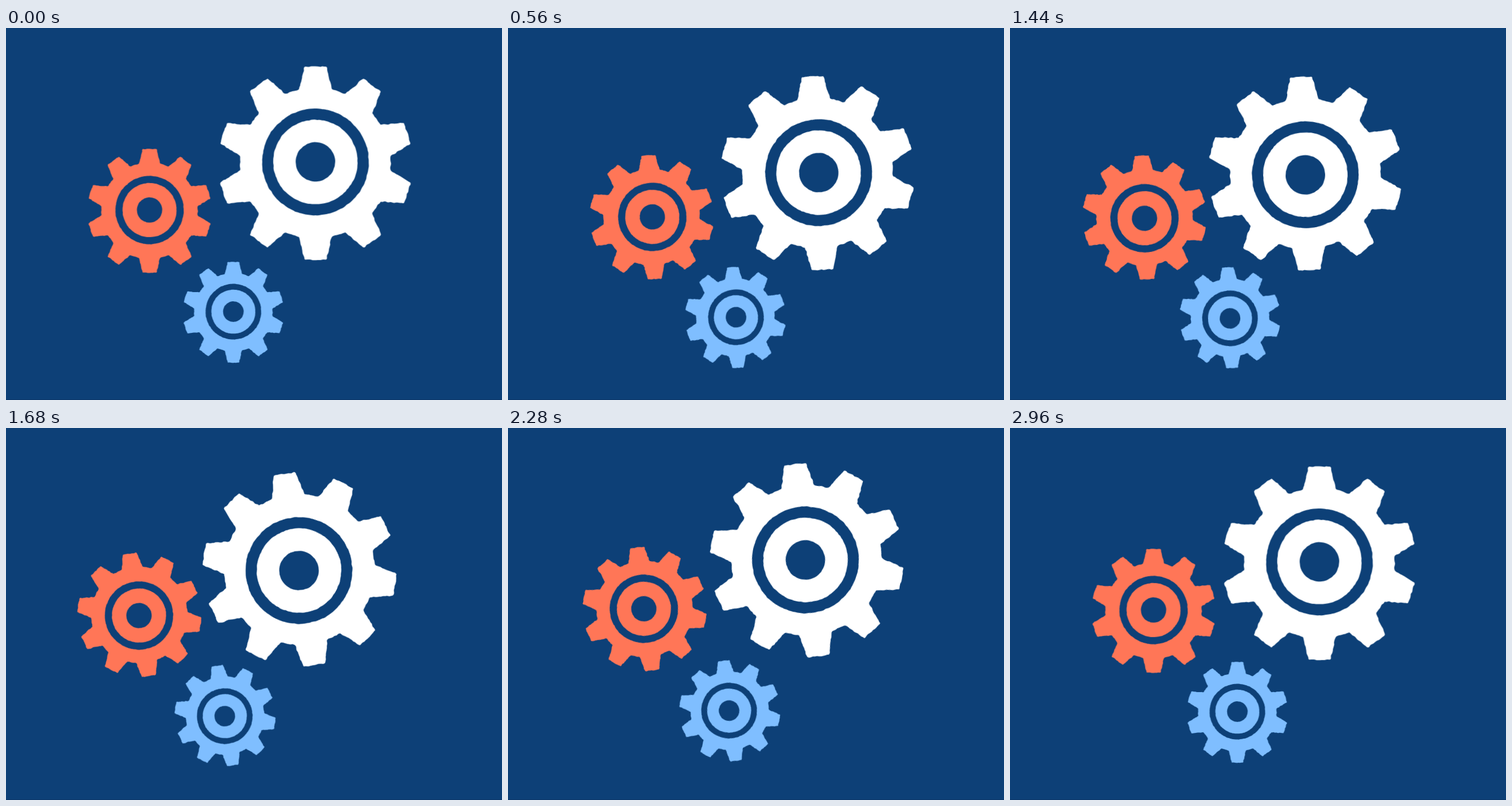
Animation of 864 by 648 pixels, one loop 3 s. Source, as an HTML page:

```html
<!DOCTYPE html>
<html lang="en">
<head>
<meta charset="utf-8">
<title>Turning gears</title>
<style>
  html, body { margin: 0; width: 100%; height: 100%; overflow: hidden; background: #0d4077; }
  svg { display: block; width: 100vw; height: 100vh; }
</style>
</head>
<body>
<svg viewBox="0 0 864 648">
  <rect width="864" height="648" fill="#0d4077"/>
  <rect y="647" width="864" height="1" fill="#0b3566"/>
</svg>
<script>
const LOOP = 3000, TURN = 2920, STEP = 40;
const TEETH = 10;
const OFFSET = [12.5, -11]; // ring centre relative to the pivot
const RIM_SHIFT = 2.2;      // the toothed rim sits a little below the rings
const GEARS = [
  { x: 526.5, y: 244.2, scale: 1, color: '#ffffff' },
  { x: 242, y: 324.1, scale: 0.64, color: '#ff7657' },
  { x: 389.5, y: 499.8, scale: 0.521, color: '#7fbeff' }
];

let seed = 7;
function random() {
  seed = (seed * 16807) % 2147483647;
  return seed / 2147483647;
}

function rotate([x, y], angle) {
  const c = Math.cos(angle), s = Math.sin(angle);
  return [x * c - y * s, x * s + y * c];
}

function toothedOutline() {
  const tooth = [[-28.5, -128.5], [-19, -168.3], [19, -168.3], [28.5, -128.5]];
  const points = [];
  for (let i = 0; i < TEETH; i++)
    points.push(...tooth.map(p => rotate(p, i * 2 * Math.PI / TEETH)));
  return points.map(([x, y]) => [x, y + RIM_SHIFT]);
}

function circle(radius) {
  const n = Math.round(radius * 0.8);
  return Array.from({ length: n }, (_, i) => rotate([0, -radius], i * 2 * Math.PI / n));
}

// Closed path with slightly ragged edges; the corners stay in place.
function ragged(corners, amount) {
  const points = [];
  corners.forEach(([x, y], i) => {
    const [nx, ny] = corners[(i + 1) % corners.length];
    const n = Math.max(1, Math.round(Math.hypot(nx - x, ny - y) / 3.5));
    for (let k = 0; k < n; k++) {
      const reach = k || n === 1 ? amount : 0;
      const jitter = () => (random() - 0.5) * 2 * reach;
      points.push([x + (nx - x) * k / n + jitter(), y + (ny - y) * k / n + jitter()]);
    }
  });
  const text = p => p.map(v => v.toFixed(2)).join(' ');
  const mid = (p, q) => [(p[0] + q[0]) / 2, (p[1] + q[1]) / 2];
  const last = points[points.length - 1];
  let d = 'M' + text(mid(last, points[0]));
  points.forEach((p, i) => {
    d += 'Q' + text(p) + ' ' + text(mid(p, points[(i + 1) % points.length]));
  });
  return d + 'Z';
}

function add(parent, name, attrs = {}) {
  const node = document.createElementNS('http://www.w3.org/2000/svg', name);
  for (const key in attrs) node.setAttribute(key, attrs[key]);
  return parent.appendChild(node);
}

const shape = ragged(toothedOutline(), 1) + ragged(circle(93), 0.8) +
  ragged(circle(73.7), 0.8) + ragged(circle(34.5), 0.4);
const stage = document.querySelector('svg');

for (const { x, y, scale, color } of GEARS) {
  const pivot = add(stage, 'g', { transform: `translate(${x} ${y}) scale(${scale})` });
  const spinner = add(pivot, 'g');
  add(spinner, 'path', {
    d: shape, fill: color, 'fill-rule': 'evenodd', transform: `translate(${OFFSET})`
  });
  spinner.animate([
    { transform: 'rotate(0deg)', offset: 0, easing: `steps(${TURN / STEP})` },
    { transform: 'rotate(360deg)', offset: TURN / LOOP },
    { transform: 'rotate(360deg)', offset: 1 }
  ], { duration: LOOP, delay: -2, iterations: Infinity });
}
</script>
</body>
</html>
```
